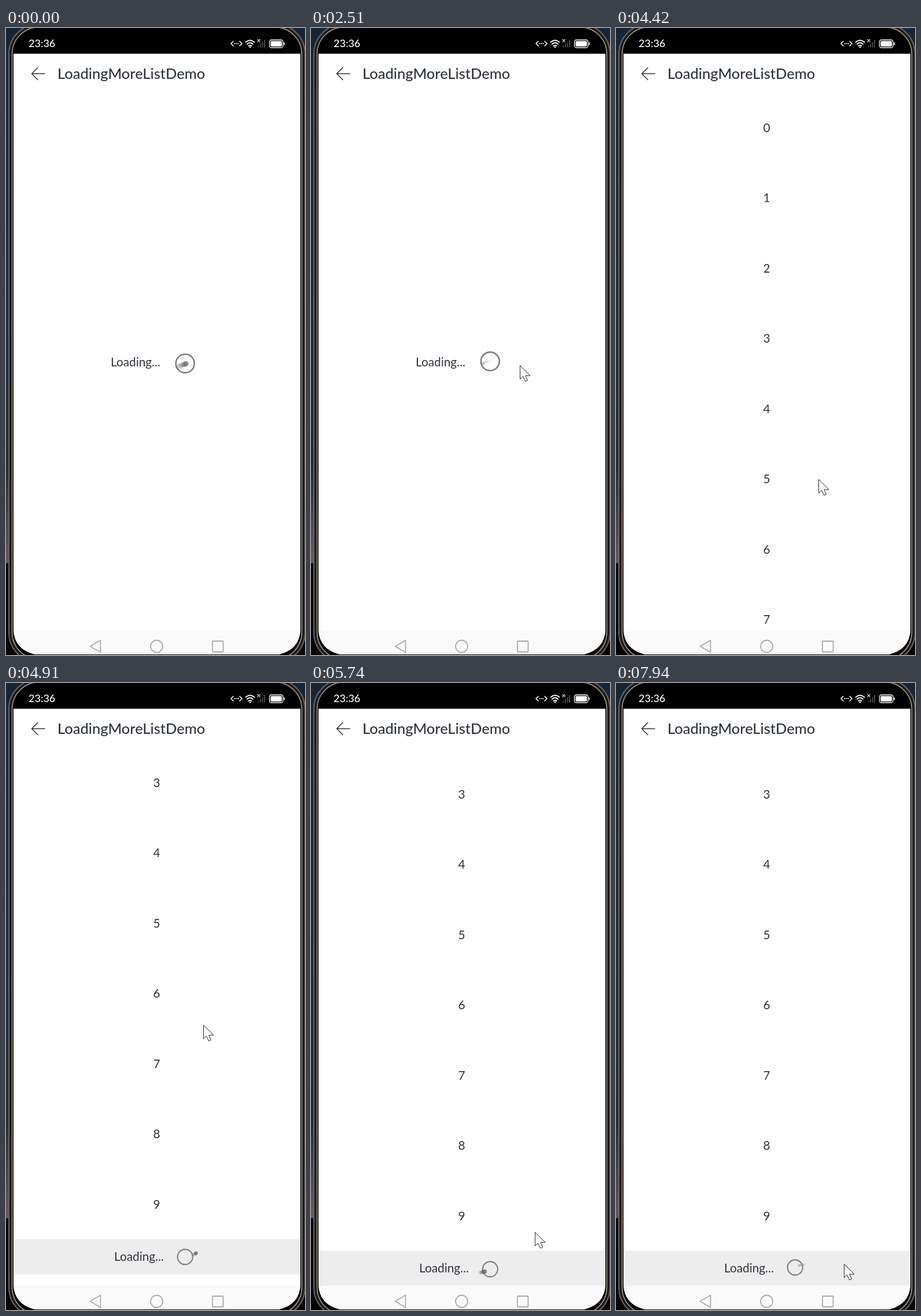
These frames come from a looping animation (517x1084 px, 8000 ms). An HTML page:

```html
<!DOCTYPE html>
<html lang="en">
<head>
<meta charset="utf-8">
<title>Loading more list</title>
<style>
  html, body { margin: 0; width: 100%; height: 100%; overflow: hidden; background: #000; }
  svg { display: block; width: 517px; height: 1084px; }
  text { font: 20.8px Lato, "Noto Sans", sans-serif; fill: #30353f; }
  .mid { text-anchor: middle; }
  .title { font-size: 25.5px; font-weight: 500; }
  .clock { font-size: 18px; font-weight: 500; fill: #fff; }
  .line { fill: none; stroke-linecap: round; stroke-linejoin: round; }
</style>
</head>
<body>
<svg viewBox="0 0 517 1084">
  <defs>
    <linearGradient id="desk" x2="0" y2="1">
      <stop offset="0" stop-color="#172635"/>
      <stop offset=".45" stop-color="#1d3040"/>
      <stop offset=".7" stop-color="#232d3a"/>
      <stop offset=".853" stop-color="#68595a"/>
      <stop offset=".854" stop-color="#050505"/>
    </linearGradient>
    <clipPath id="view"><rect x="13" y="111" width="496" height="931"/></clipPath>
    <clipPath id="glass"><path d="M13 44.5H509V1040Q508 1074 472 1083H50Q14 1074 13 1040Z"/></clipPath>
  </defs>

  <!-- phone body -->
  <rect width="517" height="1084" fill="url(#desk)"/>
  <g fill="none">
    <rect x="5" y="-7" width="512" height="1104" rx="52" fill="#0b0a0a" stroke="#6f6660" stroke-width="2"/>
    <rect x="7.5" y="-4.5" width="507" height="1099" rx="49.5" stroke="#2b2623" stroke-width="1.5"/>
    <rect x="10.5" y="-1.5" width="501" height="1093" rx="46.5" fill="#000" stroke="#91877e" stroke-width="2"/>
  </g>
  <g clip-path="url(#glass)">
    <rect x="13" y="44" width="496" height="1040" fill="#fff"/>
    <rect x="13" y="1042" width="496" height="42" fill="#fafafa"/>
  </g>

  <!-- status bar -->
  <text class="clock" x="39" y="33.3">23:36</text>
  <g class="line" stroke="#fff" stroke-width="1.6">
    <path d="M393 23l-4 4 4 4M404 23l4 4-4 4"/>
    <path d="M395.5 27h.1M398.5 27h.1M401.5 27h.1" stroke-width="2"/>
    <path d="M414.5 24.5q7.5-6.5 15 0M417 27.8q5-4.4 10 0M419.5 31q2.5-2.2 5 0" stroke-width="1.9"/>
    <path d="M422 33.3h.1" stroke-width="2.4"/>
    <path d="M435 20l4 4M439 20l-4 4" stroke-width="1.3"/>
    <path d="M428 33h.1M436.5 31v2M440 28v5M443.5 25v8M447 21v12" stroke="#555" stroke-width="1.7"/>
    <rect x="455.5" y="20.5" width="23.5" height="13.5" rx="3.5" stroke-width="1.3"/>
    <rect x="457.5" y="22.5" width="19.5" height="9.5" rx="1.8" fill="#fff" stroke="none"/>
    <path d="M481.2 25.5v3.5"/>
  </g>

  <!-- header and navigation bar -->
  <path class="line" d="M67 79H44.5M55 68.5L44.5 79 55 89.5" stroke="#30353f" stroke-width="1.6"/>
  <text class="title" x="89" y="87.5">LoadingMoreListDemo</text>
  <g class="line" stroke="#aaa" stroke-width="1.8">
    <path d="M145.5 1069L163.5 1058.5V1079.5Z"/>
    <circle cx="260.5" cy="1069" r="10.5"/>
    <rect x="357" y="1060" width="18.5" height="18.5" rx="1"/>
  </g>

  <!-- content -->
  <text id="status" y="584.8"></text>
  <g clip-path="url(#view)">
    <g id="list">
      <rect id="footer" x="13" y="1326" width="496" height="61" fill="#ededed"/>
      <text id="more" y="1363.8"></text>
    </g>
  </g>
  <g clip-path="url(#view)">
    <g id="spinner">
      <g id="comet" fill="#55555a"></g>
      <circle id="ring" r="16" fill="none" stroke="#808080" stroke-width="2.6"/>
    </g>
  </g>
  <path id="cursor" d="M.5 .5V24L5.5 19.3 9.5 28 13.5 26.3 9.8 18H18Z" fill="#fff" stroke="#222"/>
</svg>
<script>
const LOOP = 8000, ORBIT = 1200, ROW = 121.5, TAIL = 22;
const SVG = 'http://www.w3.org/2000/svg';
const $ = id => document.getElementById(id);
const list = $('list'), spinner = $('spinner'), comet = $('comet'), ring = $('ring');

// Start times of the loading phases and the moments they end
const RETRY = 1796, FAIL = 950, LOADED = 3940, MORE = 4634, MORE_FAIL = 6460, RELOAD = 7410;

const pointer = [
  [480, 495, 1000], [870, 417, 613], [950, 400, 606], [1220, 380, 598],
  [1420, 380, 598], [1490, 372, 587], [1700, 361, 583], [3900, 361, 583],
  [4270, 352, 780], [4430, 350, 780], [4640, 344, 650], [4840, 341, 591],
  [5250, 341, 591], [5740, 387, 949], [6000, 403, 996], [6390, 405, 999],
  [6930, 409, 998], [7200, 409, 998], [7400, 402, 986], [7600, 394, 1004]
];
const scroll = [
  [4430, 0], [4580, 90], [4700, 240], [4770, 315], [4850, 357], [4910, 364.5],
  [5050, 363], [5200, 352], [5400, 346], [5600, 344.5]
];

function add(parent, name, attrs) {
  const el = document.createElementNS(SVG, name);
  for (const key in attrs) el.setAttribute(key, attrs[key]);
  return parent.appendChild(el);
}

for (let i = 0; i < 10; i++)
  add(list, 'text', { class: 'mid', x: 260.5, y: 179.5 + ROW * i }).textContent = i;
const dots = Array.from({ length: TAIL }, () => add(comet, 'circle', {}));

function along(keys, t) {
  const next = keys.findIndex(k => k[0] > t);
  if (next === 0) return keys[0].slice(1);
  if (next < 0) return keys[keys.length - 1].slice(1);
  const a = keys[next - 1], b = keys[next], u = (t - a[0]) / (b[0] - a[0]);
  return a.slice(1).map((v, i) => v + (b[i + 1] - v) * u);
}

function show(el, on) { el.style.display = on ? '' : 'none'; }

function say(el, failed, x, message) {
  el.textContent = failed ? message : 'Loading...';
  el.setAttribute('x', failed ? 260.5 : x);
  el.setAttribute('class', failed ? 'mid' : '');
}

// A comet circles a bobbing ring on a tilted orbit, larger and darker in front
function spin(phase, x, y, size) {
  spinner.setAttribute('transform', `translate(${x} ${y}) scale(${size})`);
  const depth = Math.cos(2 * Math.PI * phase);
  ring.setAttribute('cy', 2 * depth);
  dots.forEach((dot, i) => {
    const k = TAIL - 1 - i, fade = 1 - k / TAIL;
    const a = 2 * Math.PI * (phase - k * 0.007);
    const px = 23.5 * Math.sin(a), near = (1 + Math.cos(a)) / 2;
    dot.setAttribute('cx', px);
    dot.setAttribute('cy', -0.36 * px + 3 * Math.cos(a));
    dot.setAttribute('r', 2.6 + 2 * near);
    dot.setAttribute('opacity', (0.08 + 0.13 * near) * fade * fade + (k ? 0 : 0.05 + 0.25 * near));
  });
  spinner.append(...(depth < 0 ? [comet, ring] : [ring, comet]));
}

function draw(now) {
  const t = now % LOOP, listed = t >= LOADED;
  const failed = t >= FAIL && t < RETRY;
  const moreFailed = t >= MORE_FAIL && t < RELOAD;
  const [offset] = along(scroll, t), [x, y] = along(pointer, t);

  show($('status'), !listed);
  say($('status'), failed, 181, 'Loading failed! click to refresh');
  show(list, listed);
  list.setAttribute('transform', `translate(0 ${-offset})`);
  say($('more'), moreFailed, 187, 'Loading failed! click to reload.');

  show(spinner, !(listed ? moreFailed : failed));
  const start = t < FAIL ? -12 : !listed ? RETRY : t < MORE_FAIL ? MORE : RELOAD;
  const phase = (t - start) / ORBIT;
  if (listed) spin(phase, 309.7, 1356.5 - offset, 0.82);
  else spin(phase, 309.7, 578, 1);

  show($('cursor'), t >= pointer[0][0]);
  $('cursor').setAttribute('transform', `translate(${x} ${y})`);
}

const begin = performance.now();
function tick() {
  draw(performance.now() - begin);
  requestAnimationFrame(tick);
}
tick();
</script>
</body>
</html>
```
